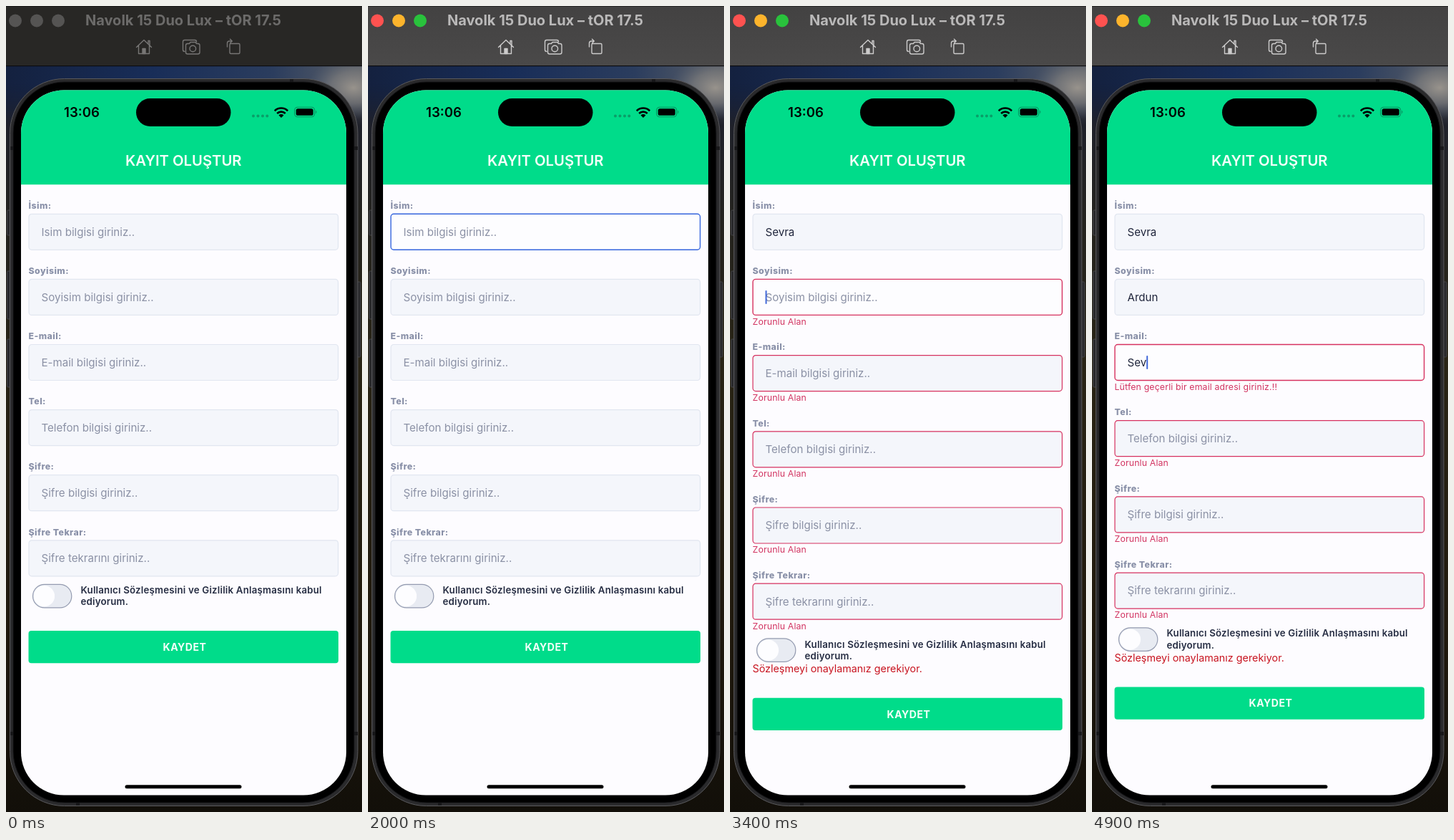
Write an HTML page that moves like this. It is 498x1125 px and loops after 5000 ms.

```html
<!DOCTYPE html>
<html lang="tr">
<head>
<meta charset="utf-8">
<title>Kayıt Oluştur</title>
<style>
  html, body { margin: 0; width: 100%; height: 100%; overflow: hidden; background: #1c170d; }
  svg { display: block; width: 100vw; height: 100vh; font-family: Inter, Roboto, sans-serif; }
  #bar { --bg: #282725; --title: #6c6b6a; --icon: #777675; --l1: #555453; --l2: #555453; --l3: #555453; }
  #bar.on { --bg: url(#barGrad); --title: #bab9b9; --icon: #cccbcb; --l1: #fe5250; --l2: #fdb42c; --l3: #29c23c; }
  .barBg { fill: var(--bg); }
  .title { font-size: 20px; font-weight: 700; fill: var(--title); }
  .icon { fill: none; stroke: var(--icon); stroke-width: 1.4; stroke-linejoin: round; stroke-linecap: round; }
  .clock { font-size: 18.6px; font-weight: 600; }
  .head { font-size: 20.3px; font-weight: 600; fill: #f6fffb; }
  .label { font-size: 12.3px; font-weight: 800; letter-spacing: .45px; fill: #8990a8; }
  .box { fill: #f4f6fb; stroke: #e1e6f0; stroke-width: 1.2; }
  .bad .box { stroke: #d6315f; }
  .focus .box { fill: #fdfdff; stroke: #3565dd; stroke-width: 1.4; }
  .focus.bad .box { stroke: #d6315f; }
  .value { font-size: 15.1px; fill: #8b91a5; }
  .filled .value { fill: #20263c; }
  .hint { font-size: 12.3px; letter-spacing: .16px; fill: #d23562; }
  .caret { fill: #4168d9; }
  .terms { font-size: 13.3px; font-weight: 600; letter-spacing: .19px; fill: #262d43; }
  .warn { font-size: 14.35px; fill: #c81420; }
  .save { font-size: 14.1px; font-weight: 700; letter-spacing: .5px; fill: #f4fffa; }
</style>
</head>
<body>
<svg viewBox="0 0 498 1125" preserveAspectRatio="none">
  <defs>
    <linearGradient id="barGrad" x2="0" y2="1">
      <stop offset="0" stop-color="#434242"/><stop offset="1" stop-color="#4a4949"/>
    </linearGradient>
    <linearGradient id="land" x2="0" y2="1">
      <stop offset="0" stop-color="#16213c"/><stop offset=".07" stop-color="#1f212b"/>
      <stop offset=".2" stop-color="#24231f"/><stop offset=".4" stop-color="#292415"/>
      <stop offset=".75" stop-color="#20190d"/><stop offset="1" stop-color="#120f09"/>
    </linearGradient>
    <linearGradient id="sky">
      <stop offset="0" stop-color="#14213f"/><stop offset=".4" stop-color="#182d58"/>
      <stop offset=".75" stop-color="#2b3d5e"/><stop offset="1" stop-color="#5d6168"/>
    </linearGradient>
    <linearGradient id="fade" x2="0" y2="1">
      <stop offset=".3" stop-color="#fff"/><stop offset="1" stop-color="#000"/>
    </linearGradient>
    <mask id="skyMask"><rect y="83" width="498" height="84" fill="url(#fade)"/></mask>
    <radialGradient id="cloud">
      <stop offset="0" stop-color="#98938c"/><stop offset=".5" stop-color="#7c7c7d" stop-opacity=".7"/>
      <stop offset="1" stop-color="#58616f" stop-opacity="0"/>
    </radialGradient>
    <filter id="shade" x="-40%" y="-40%" width="190%" height="190%">
      <feDropShadow dx="1" dy="2" stdDeviation="1.6" flood-opacity=".35"/>
    </filter>
  </defs>

  <rect y="83" width="498" height="1042" fill="url(#land)"/>
  <rect y="83" width="498" height="84" fill="url(#sky)" mask="url(#skyMask)"/>
  <ellipse cx="486" cy="114" rx="64" ry="44" fill="url(#cloud)"/>

  <g id="bar">
    <rect class="barBg" width="498" height="83.5"/>
    <rect width="498" height="1" fill="#111" opacity=".55"/>
    <rect y="83" width="498" height="1.2" fill="#0d0d0f"/>
    <circle cx="13" cy="20.5" r="9" style="fill:var(--l1)"/>
    <circle cx="43" cy="20.5" r="9" style="fill:var(--l2)"/>
    <circle cx="73" cy="20.5" r="9" style="fill:var(--l3)"/>
    <text class="title" x="248" y="27" text-anchor="middle">Navolk 15 Duo Lux – tOR 17.5</text>
    <g class="icon">
      <path d="M182.5 57.5L193 47.5L203.5 57.5M185.5 55V66.5H200.5V55M199 52.5V48.5H201V54.5"/>
      <path d="M191 66.5V59.5H195V66.5Z" style="fill:var(--icon)"/>
      <path d="M250 63.5Q247.5 63.5 247.5 61V50Q247.5 47.5 250 47.5H264Q266.5 47.5 266.5 50"/>
      <path d="M254 52.5H256.5L258 50.5H265L266.5 52.5H268.5Q271 52.5 271 55V64.5Q271 67 268.5 67H254Q251.5 67 251.5 64.5V55Q251.5 52.5 254 52.5Z"/>
      <circle cx="261.3" cy="59.5" r="4.3"/>
      <rect x="313" y="52.5" width="14" height="14" rx="1.5"/>
      <path d="M309.5 57V52Q309.5 49 312.5 49H316M313.5 46.3L316.3 49L313.5 51.7"/>
    </g>
  </g>

  <g fill="#29292b" stroke="#4b4b4e" stroke-width=".8">
    <rect x="1.5" y="285" width="8" height="35" rx="1.5"/>
    <rect x="1.5" y="370" width="8" height="67" rx="1.5"/>
    <rect x="1.5" y="465" width="8" height="67" rx="1.5"/>
    <rect x="488" y="385" width="8" height="105" rx="1.5"/>
  </g>
  <rect x="5.5" y="101.5" width="486.500" height="1015" rx="76" fill="#2a2a2c" stroke="#59595c"/>
  <g fill="#18181a">
    <rect x="397" y="102" width="5" height="6"/><rect x="98" y="1110" width="5" height="6"/>
    <rect x="6" y="196" width="5" height="5"/><rect x="487" y="196" width="5" height="5"/>
    <rect x="6" y="1013" width="5" height="5"/><rect x="487" y="1013" width="5" height="5"/>
  </g>
  <rect x="10" y="106" width="477" height="1006" rx="72" fill="#000" stroke="#161618"/>
  <rect x="21" y="117.5" width="455" height="984" rx="60" fill="#fdfcff"/>
  <path d="M21 249.300V177.500A60 60 0 0 1 81 117.500H416A60 60 0 0 1 476 177.500V249.300Z" fill="#00dc8a"/>

  <text class="clock" x="106" y="155" text-anchor="middle">13:06</text>
  <rect x="182" y="129" width="132.5" height="39" rx="19.5"/>
  <g fill="#0a9d68">
    <circle cx="346" cy="153.5" r="2"/><circle cx="352.5" cy="153.5" r="2"/>
    <circle cx="359" cy="153.5" r="2"/><circle cx="365.3" cy="153.5" r="2"/>
  </g>
  <g fill="none" stroke="#000" stroke-width="2.6">
    <path d="M375.8 146.3A13 13 0 0 1 394.2 146.3"/>
    <path d="M379.2 150A8.2 8.2 0 0 1 390.8 150"/>
  </g>
  <path d="M381.5 152.5A5 5 0 0 1 388.5 152.5L385 156Z"/>
  <rect x="403.7" y="141.2" width="28" height="13.6" rx="4.3" fill="none" stroke="#089160" stroke-width="1.1"/>
  <rect x="405.7" y="143.2" width="24" height="9.6" rx="2.6"/>
  <path d="M433.3 145.6Q435.8 148 433.3 150.4Z" fill="#089160"/>

  <text class="head" x="248.3" y="223" text-anchor="middle">KAYIT OLUŞTUR</text>

  <g id="form"></g>
  <rect class="caret" id="caret" width="2" height="19" rx="1"/>

  <g id="terms">
    <rect x="37.5" y=".5" width="54.3" height="32.5" rx="16.25" fill="#e8ebf2" stroke="#949bb0" stroke-width="1.2"/>
    <circle cx="53.5" cy="16.75" r="14.6" fill="#fdfdff"/>
    <text class="terms" x="104.5" y="13.2">Kullanıcı Sözleşmesini ve Gizlilik Anlaşmasını kabul</text>
    <text class="terms" x="104.5" y="29.3">ediyorum.</text>
    <text class="warn" id="warn" x="31.5" y="48">Sözleşmeyi onaylamanız gerekiyor.</text>
  </g>
  <g id="save">
    <rect x="31.5" width="433.5" height="45.2" rx="4" fill="#00dc8a"/>
    <text class="save" x="250" y="27.9" text-anchor="middle">KAYDET</text>
  </g>

  <rect x="166.5" y="1087.3" width="163" height="5" rx="2.5"/>
  <path id="mouse" d="M0 0V34.5L8 27.5L13.5 41L20.3 38.2L14.7 25.3H25.5Z"
        fill="#fff" stroke="#858589" stroke-width="2.2" stroke-linejoin="round" filter="url(#shade)"/>
</svg>

<script>
const LOOP = 5000, STEP = 100;
const TOP = 290, PITCH = 91.1, HINT = 15.1;
const REQUIRED = 'Zorunlu Alan';
const BAD_MAIL = 'Lütfen geçerli bir email adresi giriniz.!!';

// focus: when the field gains the caret; keys: when each letter lands
const fields = [
  { label: 'İsim:', hint: 'Isim bilgisi giriniz..', text: 'Sevra', focus: 1100, keys: [2300, 2400, 2600, 2700, 2800] },
  { label: 'Soyisim:', hint: 'Soyisim bilgisi giriniz..', text: 'Ardun', focus: 3300, keys: [3600, 3700, 3900, 4000, 4100] },
  { label: 'E-mail:', hint: 'E-mail bilgisi giriniz..', text: 'Sev', focus: 4400, keys: [4600, 4800, 4900] },
  { label: 'Tel:', hint: 'Telefon bilgisi giriniz..' },
  { label: 'Şifre:', hint: 'Şifre bilgisi giriniz..' },
  { label: 'Şifre Tekrar:', hint: 'Şifre tekrarını giriniz..' }
];
const ACTIVATE = 1000;
const VALIDATE = fields[0].keys[0];
const MOUSE = { from: 400, mid: 700, to: 1000, hide: 1700 };

const $ = id => document.getElementById(id);
const show = (el, on) => el.setAttribute('visibility', on ? 'visible' : 'hidden');
const place = (el, x, y) => el.setAttribute('transform', `translate(${x} ${y})`);

function make(parent, tag, attrs, text = '') {
  const el = document.createElementNS('http://www.w3.org/2000/svg', tag);
  for (const k in attrs) el.setAttribute(k, attrs[k]);
  el.textContent = text;
  return parent.appendChild(el);
}

for (const f of fields) {
  f.g = make($('form'), 'g', {});
  make(f.g, 'text', { class: 'label', x: 31.5, y: -7 }, f.label);
  make(f.g, 'rect', { class: 'box', x: 32, y: .3, width: 432.6, height: 50, rx: 4 });
  f.value = make(f.g, 'text', { class: 'value', x: 49.5, y: 30.7 });
  f.error = make(f.g, 'text', { class: 'hint', x: 31.5, y: 63.7 });
}

function drawForm(t) {
  const current = fields.filter(f => t >= f.focus).pop();
  const checked = t >= VALIDATE;
  let y = TOP;
  show($('caret'), false);

  fields.forEach((f, i) => {
    const keys = (f.keys || []).filter(k => k <= t);
    const typed = (f.text || '').slice(0, keys.length);
    const error = !checked ? '' : !typed ? REQUIRED : i === 2 ? BAD_MAIL : '';
    f.value.textContent = typed || f.hint;
    f.error.textContent = error;
    f.g.setAttribute('class', [f === current && 'focus', error && 'bad', typed && 'filled'].filter(Boolean).join(' '));
    place(f.g, 0, y);
    if (f === current) {
      const since = t - (keys.length ? keys[keys.length - 1] : f.focus);
      const w = typed ? f.value.getComputedTextLength() : 0;
      place($('caret'), 49.5 + w, y + 15.8);
      show($('caret'), since % 1000 < 550);
    }
    y += PITCH + (error ? HINT : 0);
  });

  const top = y - PITCH + 61.4;
  place($('terms'), 0, top);
  show($('warn'), checked);
  place($('save'), 0, top + (checked ? 83.3 : 65.1));
}

function drawMouse(t) {
  const { from, mid, to, hide } = MOUSE;
  show($('mouse'), t >= from && t < hide);
  const a = Math.min(1, Math.max(0, (t - from) / (mid - from)));
  const b = Math.min(1, Math.max(0, (t - mid) / (to - mid)));
  const rest = 163 * (1 - a) ** 2 + 17 * (1 - b) ** 2;
  place($('mouse'), 317.5 + rest, 327.5 + rest * .81);
}

const start = performance.now();
function tick(now) {
  const t = Math.floor((Math.max(0, now - start) % LOOP) / STEP) * STEP;
  $('bar').setAttribute('class', t >= ACTIVATE ? 'on' : '');
  drawForm(t);
  drawMouse(t);
  requestAnimationFrame(tick);
}
tick(start);
</script>
</body>
</html>
```
